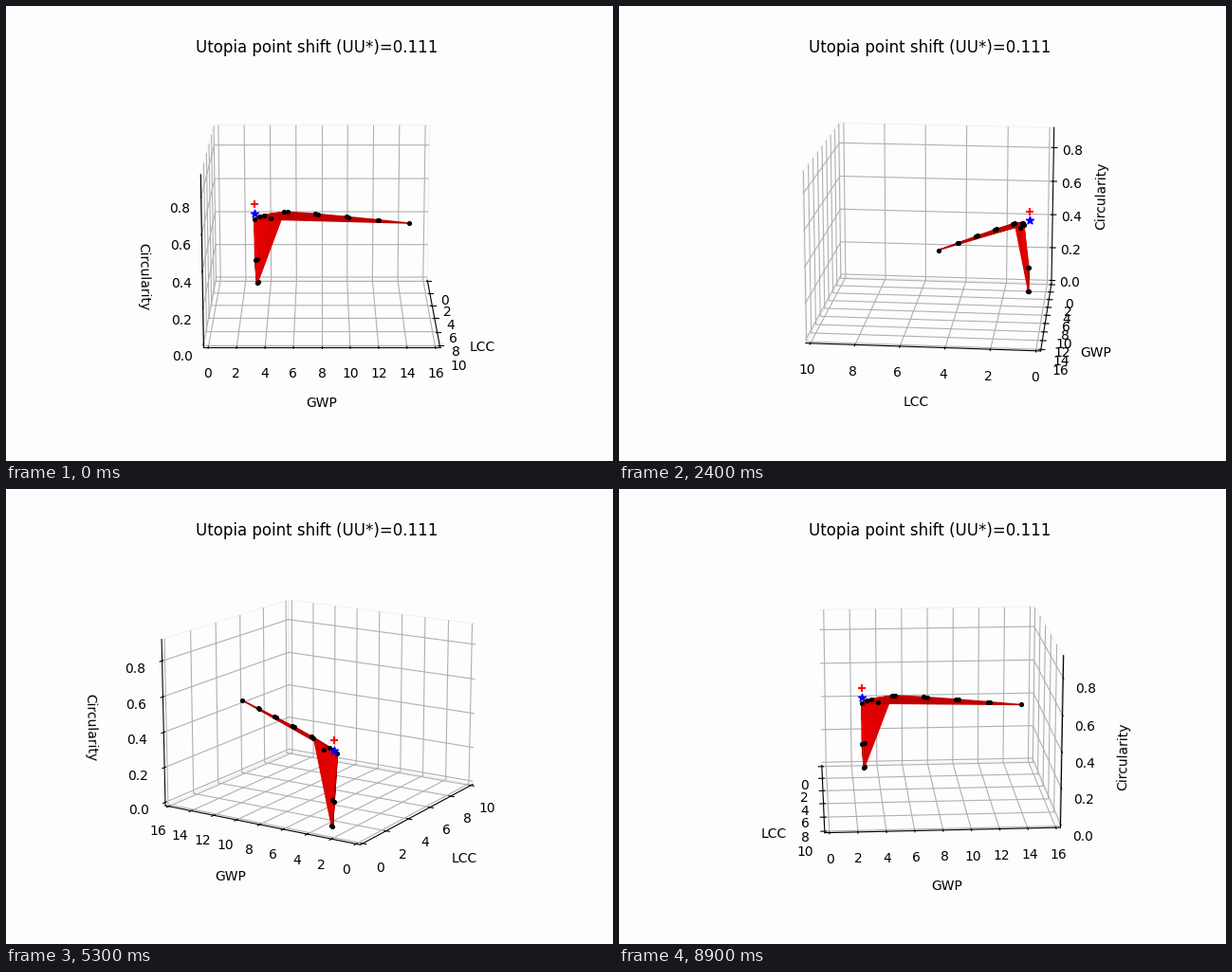
Recreate the animation shown at these times as a matplotlib script. Size 640 by 480 pixels, loop 9000 ms.

```python
import numpy as np
import matplotlib.pyplot as plt
from matplotlib.animation import FuncAnimation

FRAMES = 90
BACK = "#fdfdfd"

# Key points of the Pareto front: LCC, GWP, Circularity
SHOULDER = np.array((1.08, 2.80, 0.396))
KNEE = np.array((1.415, 5.09, 0.448))
TIP = np.array((4.425, 14.49, 0.477))
DENT = (1.18, 4.02, 0.403)
FOOT = [(0.83, 2.93, 0), (0.81, 3.00, 0.006)]
STEP = [(0.81, 2.80, 0.142), (0.845, 3.00, 0.147)]


def curve(start, end, t, power):
    """Points from start to end, each coordinate eased by its own power."""
    return start + (end - start) * t[:, None] ** np.array(power)


def pareto_front():
    rise = curve(SHOULDER, KNEE, np.linspace(0, 0.31, 3), (1.5, 1, 0.6))

    # Even stops from knee to tip; each has a twin that closes in on it
    t = np.linspace(0, 1, 5)
    t = np.sort(np.append(t, t[:-1] + 0.028 * (1 - t[:-1] ** 2)))
    ridge = curve(KNEE, TIP, t, (1, 1, 0.6))
    ridge[:, 1] += 0.2 * t * (1 - t)
    return np.vstack([FOOT, STEP, rise, DENT, ridge])


def padded(top):
    """Limits 0..top with a small margin on both sides."""
    return -top / 48, top + top / 48


front = pareto_front()
utopia = np.append(front[:, :2].min(axis=0), front[:, 2].max())
shifted = utopia - (0, 0, 0.0545)

fig = plt.figure(figsize=(6.4, 4.8), dpi=100, facecolor=BACK)
ax = fig.add_subplot(projection="3d", facecolor=BACK)

ax.plot_trisurf(*front.T, color="red", edgecolors="red", linewidth=1)
ax.scatter(*front.T, c="black", marker=".", s=30, depthshade=False)
ax.scatter(*utopia, c="red", marker="+", s=36, depthshade=False)
ax.scatter(*shifted, c="blue", marker="*", s=36, depthshade=False)

ax.set(xlim=padded(10), ylim=padded(16), zlim=padded(0.9),
       xticks=np.arange(0, 11, 2), yticks=np.arange(0, 17, 2),
       zticks=np.arange(5) / 5)
ax.set_xlabel("LCC", labelpad=10)
ax.set_ylabel("GWP", labelpad=10)
ax.set_zlabel("Circularity", labelpad=10)
ax.set_title("Utopia point shift (UU*)=0.111")

for axis in (ax.xaxis, ax.yaxis, ax.zaxis):
    axis.pane.set_facecolor("none")
    axis.pane.set_edgecolor("0.92")


def update(i):
    azim = 360 * i / FRAMES
    # Tiny nudge keeps the low-GWP wall in edge-on views
    azim += 1e-6 * np.cos(np.radians(azim))
    ax.view_init(elev=15, azim=azim)
    return ()


anim = FuncAnimation(fig, update, frames=FRAMES, interval=100,
                     init_func=lambda: update(0), repeat=True, blit=False)
plt.show()
```
